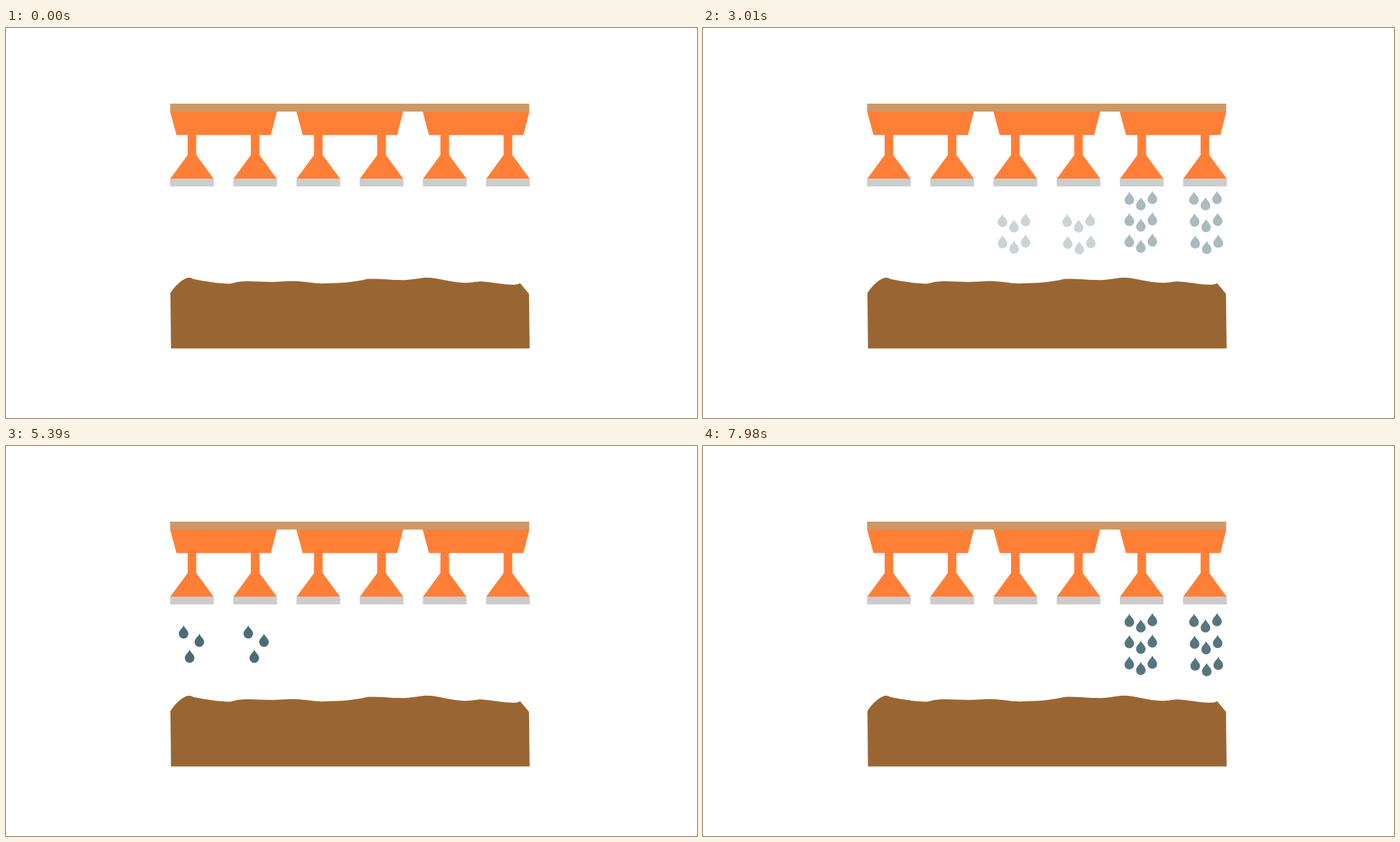
Write an HTML page that moves like this. It is 996 px wide and 562 px high and loops after 8 s.

```html
<!DOCTYPE html>
<html lang="en">
<head>
<meta charset="utf-8">
<title>Sprinklers</title>
<style>
  html, body { margin: 0; width: 100%; height: 100%; overflow: hidden; background: #fff; }
  svg { display: block; width: 100vw; height: 100vh; }
</style>
</head>
<body>
<svg viewBox="0 0 996 562">
  <defs>
    <path id="drop" d="M0-12C1-7.5 6.9-5 6.9.3A6.9 6.9 0 0 1-6.9.3C-6.9-5-1-7.5 0-12Z"/>
    <g id="nozzle">
      <path fill="#ff7f37" d="M25.3 153H37.7V183L63 217.5H0L25.3 183Z"/>
      <path fill="#ccc" d="M0 217.5H63V228.3H0Z"/>
    </g>
    <path id="tank" fill="#ff7f37" d="M0 120H154L145.3 154.3H9.2Z"/>
  </defs>
  <g id="machine"></g>
  <path fill="#c96" d="M236.5 109H754.2V120.4H236.5Z"/>
  <path fill="#963" d="M237 382C244 371 254 362 262 360Q266 359 270 361.8C287 365 306 368.5 322 368.5C329 368 330 366 338 365.6C358 364 375 367 395 365.6C425 363 435 367.5 455 368.2C475 367.5 500 367 520 361.7C540 361 555 363.5 575 363.2C590 362.5 596 359.8 607 359.8C625 360 640 367 663 367.2C675 367 678 365 688 365.4C705 367 722 370.5 735 369.8Q739 369.5 741 367.8L753.8 383L754.8 461.8H237.8Z"/>
  <g id="rain" fill="#4b6c75"></g>
</svg>
<script>
const FRAME = 70, LOOP = 8000, CYCLE = 4620;
const LIFE = 1820, FADE_IN = 750, FADE_OUT = 1330;
const machine = document.getElementById('machine');
const rain = document.getElementById('rain');

function add(parent, name, attrs = {}) {
  const el = document.createElementNS('http://www.w3.org/2000/svg', name);
  for (const key in attrs) el.setAttribute(key, attrs[key]);
  return parent.appendChild(el);
}

for (let i = 0; i < 3; i++) add(machine, 'use', { href: '#tank', x: 236.5 + i * 182 });
for (let i = 0; i < 6; i++) add(machine, 'use', { href: '#nozzle', x: 236.5 + i * 91.1 });

// [age in ms, distance fallen]
const path = [[0, 0], [350, 9], [700, 15], [840, 18], [1050, 20.2], [1260, 22.5], [LIFE, 28]];

function fall(age) {
  const i = path.findIndex(p => p[0] >= age);
  if (i < 1) return 0;
  const [t0, y0] = path[i - 1], [t1, y1] = path[i];
  return y0 + (y1 - y0) * (age - t0) / (t1 - t0);
}

const trio = [[0, 0], [22.7, 12], [8.7, 35]];
const row = [[0, 0], [16.6, 8], [33.2, -1]];

const showers = [
  { start: 0, x: 256, y: 253.8, shape: trio, rows: 1 },
  { start: 1330, x: 431.7, y: 253, shape: row, rows: 2 },
  { start: 2660, x: 614.5, y: 238.6, shape: row, rows: 3 }
];

for (const s of showers) {
  s.group = add(rain, 'g');
  for (let side = 0; side < 2; side++)
    for (let r = 0; r < s.rows; r++)
      for (const [dx, dy] of s.shape)
        add(s.group, 'use', {
          href: '#drop',
          x: s.x + dx + side * (93.2 + r * 0.9),
          y: s.y + dy + r * (30.6 + side * 0.9)
        });
}

function draw(now) {
  const time = Math.floor((now % LOOP) / FRAME) * FRAME % CYCLE;
  for (const { start, group } of showers) {
    const age = time - start;
    const alpha = Math.min(1, age / FADE_IN, (LIFE - age) / (LIFE - FADE_OUT));
    group.setAttribute('opacity', Math.max(0, alpha));
    group.setAttribute('transform', `translate(0 ${fall(age)})`);
  }
}

const begin = performance.now();
function tick() {
  draw(performance.now() - begin);
  requestAnimationFrame(tick);
}
tick();
</script>
</body>
</html>
```
